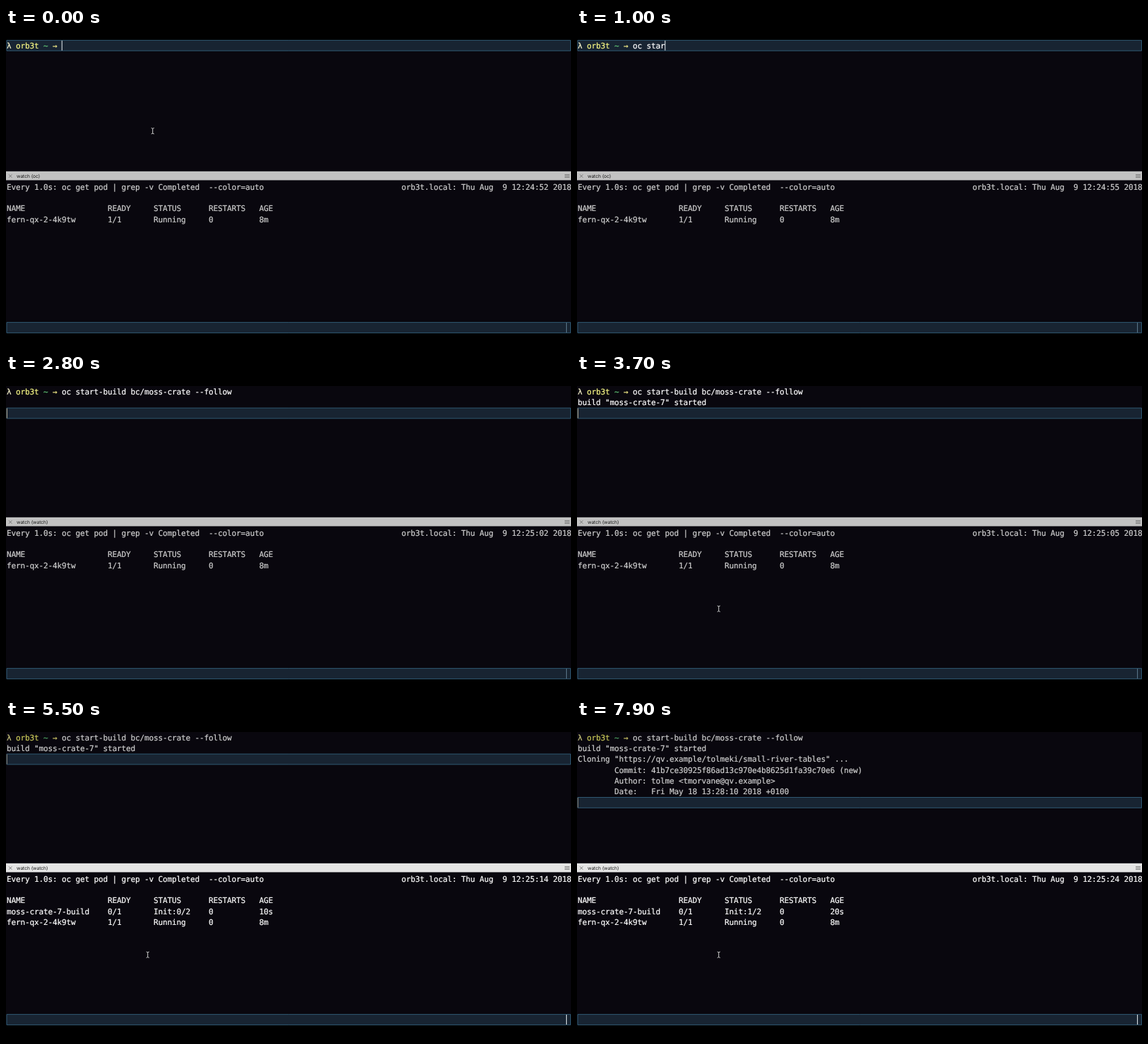
Animation of 800 by 450 pixels, one loop 8 s. Source, as an HTML page with a canvas:

```html
<!DOCTYPE html>
<html lang="en">
<head>
<meta charset="utf-8">
<title>Terminal build</title>
<style>
  html, body { margin: 0; width: 100%; height: 100%; overflow: hidden; background: #000; }
  canvas { display: block; }
</style>
</head>
<body>
<canvas id="stage" width="800" height="450"></canvas>
<script>
const ctx = document.getElementById('stage').getContext('2d');
const LOOP = 8000, STEP = 100;
const CELL = 6.5, LINE = 15.35, LEFT = 1;
const TOP_BASE = 28.6, LOW_BASE = 228.7;
const MONO = '11px "DejaVu Sans Mono", monospace';
const BRIGHT = '#fdfdfd', DIM = '#cdcdcd';

const HOST = 'orb3t';
const COMMAND = 'oc start-build bc/moss-crate --follow';
const PROMPT = 12;
const STARTED = 'build "moss-crate-7" started';
const LOG = [
  'Cloning "https://qv.example/tolmeki/small-river-tables" ...',
  '        Commit: 41b7ce30925f86ad13c970e4b8625d1fa39c70e6 (new)',
  '        Author: tolme <tmorvane@qv.example>',
  '        Date:   Fri May 18 13:28:10 2018 +0100'
];

// [start ms, seconds after 12:24:00, age of the build pod]
const TICKS = [
  [0, 52], [800, 55], [1500, 58], [2300, 62], [3100, 65], [3900, 68, 4],
  [4700, 71, 7], [5500, 74, 10], [6300, 77, 14], [7000, 81, 17], [7900, 84, 20]
];

const ENTER = 2800, START_MSG = 3000, FOCUS = 3800, CLONE = 6500;

function rect(x, y, w, h, color) {
  ctx.fillStyle = color;
  ctx.fillRect(x, y, w, h);
}

// Terminal text: one glyph per grid cell, slightly thickened
function text(str, col, y, color) {
  ctx.font = MONO;
  ctx.fillStyle = ctx.strokeStyle = color;
  ctx.lineWidth = 0.22;
  [...str].forEach((ch, i) => {
    if (ch === ' ') return;
    const x = LEFT + (col + i) * CELL;
    ctx.fillText(ch, x, y);
    ctx.strokeText(ch, x, y);
  });
}

function bar(y, cursorX, cursorColor) {
  rect(1, y + 0.4, 798.4, 14.8, '#182432');
  ctx.strokeStyle = '#33607b';
  ctx.lineWidth = 0.9;
  ctx.strokeRect(1, y + 0.4, 798.4, 14.8);
  rect(cursorX, y + 0.8, 1.1, 14, cursorColor);
}

function typedCount(t) {
  const n = t < 1000 ? (t - 300) / 100 : 7 + (t - 1000) / 50;
  return Math.max(0, Math.min(COMMAND.length, Math.floor(n)));
}

function drawTop(t, focused) {
  const ink = focused ? BRIGHT : DIM;
  const typed = typedCount(t);
  const lines = t < ENTER ? [] : t < START_MSG ? [''] : [STARTED];
  if (t >= CLONE) lines.push(...LOG);

  const row = t < ENTER ? 0 : lines.length + 1;
  const cursorX = row ? 0.9 : LEFT + (PROMPT + typed) * CELL - 0.3;
  bar(17 + row * LINE, cursorX, !row ? '#d4dbe0' : focused ? '#a39a86' : '#77736c');

  text('λ', 0, TOP_BASE, focused ? '#fffbd0' : '#cdc97e');
  text(HOST, 2, TOP_BASE, focused ? '#f7f784' : '#c8c658');
  text('~', 8, TOP_BASE, focused ? '#62c878' : '#4fa564');
  text('→', 10, TOP_BASE, focused ? '#f8f08a' : '#cdc668');
  text(COMMAND.slice(0, typed), PROMPT, TOP_BASE, ink);
  lines.forEach((line, i) => text(line, 0, TOP_BASE + (i + 1) * LINE, ink));
}

function drawTitle(t, focused) {
  rect(0, 202.8, 800, 12.6, focused ? '#e5e5e5' : '#c2c2c2');
  ctx.font = '6.6px Inter, sans-serif';
  ctx.fillStyle = '#151515';
  ctx.fillText(t < 2300 ? 'watch (oc)' : 'watch (watch)', 15, 211.6);

  ctx.strokeStyle = '#666';
  ctx.lineWidth = 0.8;
  ctx.beginPath();
  ctx.moveTo(4, 207.3); ctx.lineTo(8.4, 211.7);
  ctx.moveTo(8.4, 207.3); ctx.lineTo(4, 211.7);
  for (let y = 207.5; y < 213; y += 2) {
    ctx.moveTo(791, y); ctx.lineTo(798, y);
  }
  ctx.stroke();
}

function podRow(cells, line, ink) {
  [0, 22, 32, 44, 55].forEach((col, i) => text(cells[i], col, LOW_BASE + line * LINE, ink));
}

function drawBottom(t, focused) {
  const ink = focused ? BRIGHT : DIM;
  const [, secs, age] = TICKS.filter(k => k[0] <= t).pop();
  const clock = `12:${24 + Math.floor(secs / 60)}:${String(secs % 60).padStart(2, '0')}`;
  text('Every 1.0s: oc get pod | grep -v Completed  --color=auto', 0, LOW_BASE, ink);
  text(`${HOST}.local: Thu Aug  9 ${clock} 2018`, 86, LOW_BASE, ink);

  const rows = [['fern-qx-2-4k9tw', '1/1', 'Running', '0', '8m']];
  if (age) {
    const status = t < 5500 ? 'Pending' : t < 7900 ? 'Init:0/2' : 'Init:1/2';
    rows.unshift(['moss-crate-7-build', '0/1', status, '0', age + 's']);
  }
  podRow(['NAME', 'READY', 'STATUS', 'RESTARTS', 'AGE'], 2, ink);
  rows.forEach((cells, i) => podRow(cells, i + 3, ink));
  bar(416.2, 793, focused ? '#d5dde2' : '#587487');
}

// The pointer hides while typing
function drawPointer(t) {
  if (t >= 300 && t < 3500) return;
  const k = t < 300 ? 0 : Math.min(1, (t - 3500) / 200);
  const x = 207.7 - 7 * k, y = 145.7 + 186.5 * k;
  ctx.strokeStyle = '#d0d0d0';
  ctx.lineWidth = 1;
  ctx.beginPath();
  ctx.moveTo(x - 2, y - 4.2); ctx.lineTo(x, y - 3.4); ctx.lineTo(x + 2, y - 4.2);
  ctx.moveTo(x, y - 3.4); ctx.lineTo(x, y + 3.4);
  ctx.moveTo(x - 2, y + 4.2); ctx.lineTo(x, y + 3.4); ctx.lineTo(x + 2, y + 4.2);
  ctx.stroke();
}

function draw(t) {
  rect(0, 0, 800, 450, '#000');
  rect(0, 17, 800, 415, '#09070e');
  const lowFocus = t >= FOCUS;
  drawTop(t, !lowFocus);
  drawTitle(t, lowFocus);
  drawBottom(t, lowFocus);
  drawPointer(t);
}

ctx.textBaseline = 'alphabetic';
ctx.textRendering = 'geometricPrecision';
ctx.lineJoin = 'round';
const start = performance.now();
function frame() {
  const t = (performance.now() - start) % LOOP;
  draw(Math.floor(t / STEP) * STEP);
  requestAnimationFrame(frame);
}
frame();
</script>
</body>
</html>
```
